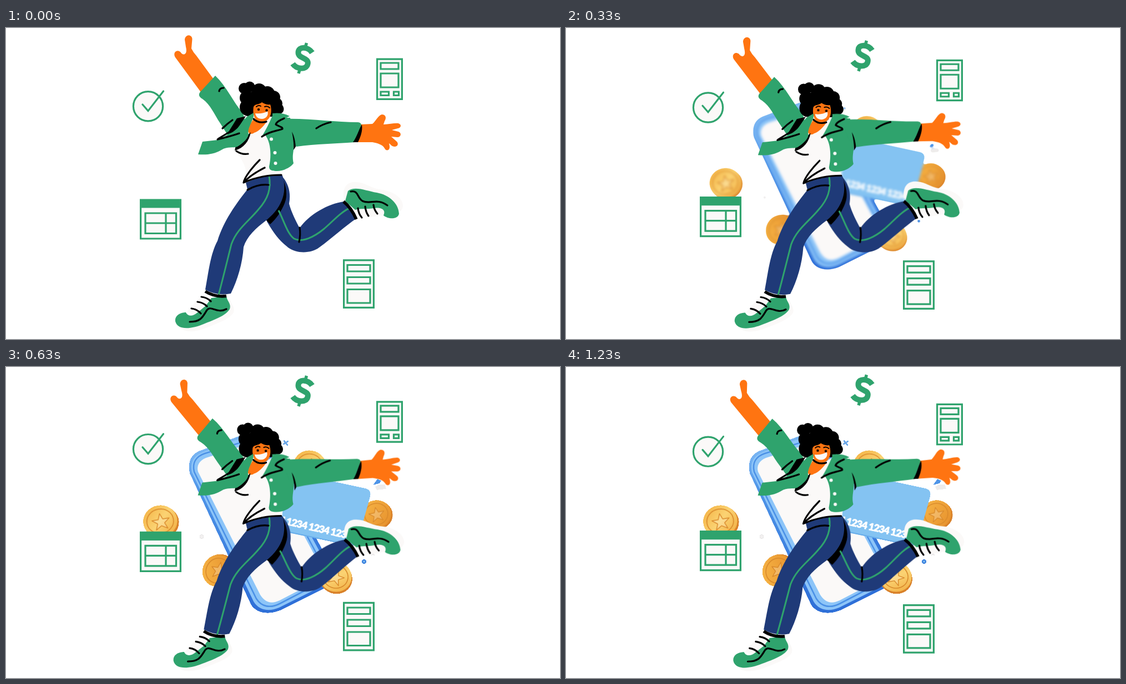
Animation, 998 px wide and 561 px high, one loop 1.31 s. Source, as an HTML page:

```html
<!DOCTYPE html>
<html lang="en">
<head>
<meta charset="utf-8">
<title>Leap</title>
<style>
@property --p { syntax: '<number>'; inherits: true; initial-value: 0; }
@property --q { syntax: '<number>'; inherits: true; initial-value: 0; }
@property --r { syntax: '<number>'; inherits: true; initial-value: 0; }
html, body { margin: 0; width: 100%; height: 100%; overflow: hidden; background: #fff; }
svg { display: block; width: 100%; height: 100%; animation: 1.31s linear infinite; animation-name: pose, slow, quick; }

/* sine up to the peak, then the first part of the way back */
@keyframes pose {
  0% { --p: 0; animation-timing-function: cubic-bezier(.37,0,.63,1); }
  71.8% { --p: 1; animation-timing-function: cubic-bezier(.333,0,.667,.333); }
  100% { --p: .7; }
}
@keyframes slow {
  0% { --q: 0; animation-timing-function: cubic-bezier(.37,0,.63,1); }
  86.3% { --q: 1; animation-timing-function: cubic-bezier(.333,0,.667,.333); }
  100% { --q: .96; }
}
@keyframes quick {
  0% { --r: 0; animation-timing-function: cubic-bezier(.37,0,.63,1); }
  68.7% { --r: 1; animation-timing-function: cubic-bezier(.333,0,.667,.333); }
  100% { --r: .88; }
}

/* x, y in px and a in degrees at the far end of the swing */
.m { transform: translate(calc(var(--p)*var(--x)*1px), calc(var(--p)*var(--y)*1px)) rotate(calc(var(--p)*var(--a)*1deg)); }
.body { --x: -.6; --y: 4.6; --a: 0; }
.head { --x: 0; --y: 0; --a: -2.6; transform-origin: 455px 175px; }
.arm-l { --x: 0; --y: 1; --a: -4; transform-origin: 420px 175px; }
.arm-r { --x: 0; --y: 0; --a: -4.5; transform-origin: 505px 185px; }
.leg-f { --x: 0; --y: 4; --a: 1; transform-origin: 470px 275px; }
.leg-b { --x: 2; --y: 3; --a: -2.6; transform-origin: 490px 300px; }
.slow { transform: translateY(calc(var(--q)*var(--y)*1px)); }
.quick { transform: translateY(calc(var(--r)*var(--y)*1px)); }

.back { filter: url(#crisp); animation: show 1.31s step-end infinite; }
.pop { transform-origin: 458px 298px; animation: pop 1.31s linear infinite; }
@keyframes show { 0% { visibility: hidden; } 7.4%, 100% { visibility: visible; } }
@keyframes pop {
  0% { transform: scale(.82); filter: blur(9px); }
  15.3% { transform: scale(.892); filter: blur(4.6px); }
  32.8% { transform: scale(.993); filter: blur(.3px); }
  40.5%, 100% { transform: none; filter: blur(0); }
}
.open { animation: open 1.31s step-end infinite; }
.shut { animation: shut 1.31s step-end infinite; }
@keyframes open { 0%, 22% { opacity: 1; } 10% { opacity: 0; } }
@keyframes shut { 0%, 22% { opacity: 0; } 10% { opacity: 1; } }

.g { fill: #2fa36d; } .o { fill: #ff7411; } .n { fill: #1f3a78; } .w { fill: #fbf9f8; }
.ln { fill: none; stroke: #000; stroke-width: 3.2; stroke-linecap: round; stroke-linejoin: round; }
.thin { stroke-width: 2; }
.cuff { stroke-width: 5.5; stroke-linecap: butt; }
.st { fill: none; stroke: #2fa36d; stroke-width: 3; }
.ic { fill: #fbf9f8; stroke: #2fa36d; stroke-width: 3.2; }
.num { font: 900 18px Lato, Inter, sans-serif; letter-spacing: -1px; fill: #fff; stroke: #fff; stroke-width: .7; }
</style>
</head>
<body>
<svg viewBox="0 0 998 561" preserveAspectRatio="none">
<defs>
  <filter id="crisp" filterUnits="userSpaceOnUse" x="0" y="0" width="998" height="561" color-interpolation-filters="sRGB">
    <feComponentTransfer><feFuncA type="linear" slope="5" intercept="-2.8"/></feComponentTransfer>
  </filter>
  <linearGradient id="gold" x1="0" y1="0" x2="1" y2="1">
    <stop offset="0" stop-color="#f3ae3d"/><stop offset=".5" stop-color="#fbd373"/><stop offset="1" stop-color="#f0a93c"/>
  </linearGradient>
  <linearGradient id="amber" x1="0" y1="0" x2="1" y2="1">
    <stop offset="0" stop-color="#f8b848"/><stop offset="1" stop-color="#e58e2b"/>
  </linearGradient>
  <linearGradient id="edge" x1="0" y1="0" x2=".3" y2="1">
    <stop offset="0" stop-color="#8fc6f8"/><stop offset=".3" stop-color="#4f95e8"/><stop offset="1" stop-color="#2f70d8"/>
  </linearGradient>
  <g id="coin">
    <ellipse cx="1" cy="2" rx="30" ry="28" fill="#d9822b"/>
    <ellipse cx="-1" cy="-1" rx="29.5" ry="27.5"/>
    <ellipse cx="-1" cy="-1" rx="23" ry="21" fill="none" stroke="#d98a2c" stroke-width="1.6"/>
    <path d="M0-14 4-4 15-4 6 3 10 13 0 7-10 13-6 3-15-4-4-4Z" fill="#fff" fill-opacity=".22" stroke="#d98a2c" stroke-width="1.4" stroke-linejoin="round"/>
  </g>
  <path id="shoeB" d="M611 312 616 294C628 284 650 294 668 297C690 301 707 316 708 335C706 346 688 345 680 338C685 328 676 323 664 325C650 327 640 325 629 328Z"/>
  <path id="shoeF" d="M370 487 397 484C399 494 406 497 403 507C396 519 376 526 356 534C335 543 309 546 305 529C304 517 316 513 324 513C327 520 336 521 344 514L360 501Z"/>
</defs>

<g class="back"><g class="pop">
  <use href="#coin" transform="translate(279 279) rotate(-10) scale(1.05)" fill="url(#gold)"/>
  <use href="#coin" transform="translate(548 179) rotate(10)" fill="url(#gold)"/>
  <use href="#coin" transform="translate(668 266) rotate(-12) scale(.92)" fill="url(#amber)"/>
  <use href="#coin" transform="translate(383 367) rotate(-60)" fill="url(#amber)"/>
  <path d="M331 192C326 168 336 155 352 150L424 123C442 118 454 120 462 132L588 362C596 382 592 390 576 398L494 439C472 448 450 444 441 428Z" fill="url(#edge)"/>
  <path d="M335 190C331 170 340 159 356 153L424 128C440 122 450 124 457 135L582 364C590 381 586 386 572 394L492 434C473 442 456 439 446 423Z" fill="#8dc5f8"/>
  <path d="M339 189C335 172 343 161 358 156L424 136 454 140 574 364C580 379 578 383 566 389L493 427C475 436 460 432 451 418Z" fill="#8dc5f8" stroke="#4b91e6" stroke-width="2.6"/>
  <path d="M346 189C343 178 348 169 360 164L424 143 452 146 569 364C574 377 573 380 562 385L493 421C478 428 467 425 458 411Z" fill="#fbf9f8"/>
  <path d="M505 188 648 219Q659 222 656 234L634 312Q631 323 618 321L495 296Z" fill="#84c3f2"/>
  <path d="M497 295 618 321Q631 323 634 312" fill="none" stroke="#69aeea" stroke-width="2"/>
  <text class="num" transform="translate(464 275) rotate(13)">1234 1234 1234 1234</text>
  <use href="#coin" transform="translate(594 379) rotate(20)" fill="url(#gold)"/>
  <path d="M501 133 507 141M508 134 500 139" stroke="#6fa9e8" stroke-width="3" stroke-linecap="round"/>
  <path d="M661 213 669 202 676 205 673 210Z" fill="#4f95e8"/>
  <path d="M665 216 671 212 683 212 685 220 668 222Z" fill="#eeeceb"/>
  <circle cx="645" cy="351" r="3" fill="#84c3f2" stroke="#3f83df" stroke-width="2.6"/>
  <circle cx="352.5" cy="306" r="3.6" fill="#f3f1f1" stroke="#e4e2e2"/>
  <path d="M658 334 664 340M664 334 658 340" stroke="#eae8e8" stroke-width="2"/>
</g></g>

<g class="ic slow" style="--y:11.5">
  <circle cx="256" cy="141.3" r="26.6"/>
  <path d="M246 138 256 149.5 283.5 114" fill="none" stroke-linecap="round"/>
</g>
<g class="quick" style="--y:-14" fill="none" stroke="#2fa36d">
  <path d="M551.5 44.5C545 34 527 32 526.5 44C526 56 546.5 53 543.5 65C541 76.500 523 74 516.5 64.500" stroke-width="10"/>
  <path d="M541.5 27 538 38M530.5 71 527 82" stroke-width="5.5"/>
</g>
<g class="ic slow" style="--y:11.5">
  <path d="M668.6 56.1H713.4V128.4H668.6ZM675 63H707V74H675ZM675 82H707V107H675ZM675 115H689.5V121.5H675ZM698.5 115H707.5V121.5H698.5Z"/>
</g>
<g class="ic quick" style="--y:-14.5">
  <path d="M242.6 310H314.4V380H242.6ZM251 334H306.5V370.5H251ZM288 334V370.5M251 352H306.5"/>
  <path class="g" d="M242.600 310.600H314.400V323H242.600Z"/>
</g>
<g class="ic slow" style="--y:11">
  <path d="M608.6 418.8H662.4V504.3H608.6ZM615 427.5H656V439H615ZM615 449.5H656V461H615ZM615 471.5H656V496H615Z"/>
</g>

<g class="m leg-b">
  <path class="w" d="M608 306C606 284 618 276 632 278C648 279 655 288 672 291C700 294 716 308 715 322C712 336 700 330 690 336L650 342 630 330Z"/>
  <path class="n" d="M496 266C511 282 513 300 510 317C514 332 522 348 529 361C545 337 580 317 609 313L632 343C610 358 590 377 564 396C550 407 521 408 506 394C492 383 482 370 470 349L490 300Z"/>
  <path d="M497 268C505 285 508 302 502 316C496 331 487 344 476 354L464 342 480 300Z"/>
  <path class="st" d="M491 329C500 346 507 372 519 380C534 388 556 376 572 363C588 350 602 332 621 324"/>
  <path class="ln" d="M529 360Q531 373 528 386"/>
  <use href="#shoeB" class="g"/>
  <path class="ln cuff" d="M608 313Q622 324 631 345"/>
  <path class="ln" d="M634 325Q635 335 641 342M647 322Q648 332 653 339M662 319Q663 328 669 335M621 295C635 292 632 306 642 312C656 319 668 306 687 320"/>
</g>

<g class="m leg-f">
  <use href="#shoeF" class="w" transform="translate(7 6)"/>
  <path class="n" d="M432 279Q462 264 498 266C506 292 501 320 470 346C450 361 434 376 428 395C426 425 417 455 405 479Q381 484 359 472C365 440 368 408 381 384C392 348 415 316 435 291Z"/>
  <path class="st" d="M474 267C478 290 472 308 455 327C438 348 416 362 406 390C398 422 390 455 383 481"/>
  <path class="ln" d="M435 292Q454 281 473 283"/>
  <path class="w" d="M326 512 345 490 357 482 372 488 362 505 342 519Z"/>
  <use href="#shoeF" class="g"/>
  <path class="ln cuff" d="M359 475Q376 486 397 483.500"/>
  <path class="ln" d="M334 506Q344 507 351 515M345 494Q355 495 362 502M352 485Q362 486 369 493M331 530C350 530 354 522 360 512C368 496 378 517 397 507"/>
</g>

<g class="m body">
  <path class="w" d="M479 160 436 190 414 222C424 236 432 248 432 260L427 279Q456 264 497 264L482 240 480 195Z"/>
  <path class="ln" d="M430 278Q460 265 496 265"/>
  <path class="ln" d="M457 238C445 250 430 268 428 279C438 267 452 259 466 252M415 222Q425 229 436 227"/>

  <g class="m arm-l">
    <path class="o" d="M352 117 305 53C300 45 307 38 314 43Q318 49 322 47C326 45 325 38 324 34L322 21C323 11 335 11 335.500 20L334 37Q338 45 343 50L376 95Z"/>
    <path class="g" d="M377 86 353 112C345 119 347 124 354 128C369 139 374 154 386 172L400 194 432 172 427 154C408 132 398 106 377 86Z"/>
    <path class="ln" d="M384 114Q385 108 392 108"/>
  </g>

  <g class="m head">
    <g>
      <circle cx="429" cy="109" r="10"/><circle cx="439" cy="106" r="9.5"/><circle cx="456" cy="113" r="13"/>
      <circle cx="471" cy="118" r="13"/><circle cx="482" cy="125" r="12"/><circle cx="488" cy="136" r="10"/>
      <circle cx="491" cy="146" r="9.5"/><circle cx="434" cy="126" r="13"/><circle cx="437" cy="143" r="16"/>
      <circle cx="455" cy="134" r="23"/><circle cx="478" cy="146" r="14"/>
    </g>
    <path class="o" d="M446 142C449 136 455 139 461 134C466 137 470 139 476 138C480 150 478 168 461 170C447 170 444 154 446 142Z"/>
    <path class="w" d="M449 154C457 155 465 154 471 150C474 157 468 164 461 164C454 164 450 160 449 154Z"/>
    <path class="ln thin" d="M451 142Q455 138 459 141M466 142Q471 140 475 144"/>
    <g class="open"><circle cx="455" cy="147" r="2.2"/><circle cx="469.5" cy="148.5" r="2.2"/></g>
    <path class="ln thin shut" d="M452 148Q456 144 459 148M466 149Q470 145 473 150"/>
  </g>
  <path class="o" d="M447 162 436 180C434 189 440 194 447 189C456 186 463 178 470 169Q456 174 447 162Z"/>
  <path class="ln" d="M446 164Q455 173 469 169"/>

  <path d="M416 163 432 159 414 186 398 192Z"/>
  <path d="M441 188C438 204 428 217 412 221L414 212Z"/>
  <path class="g" d="M446 153 434 160C426 168 420 180 408 188L381 202 354 205 346 228C362 229 374 228 388 220C399 213 410 217 417 214C430 206 436 198 437 192C434 184 442 172 446 160Z"/>
  <path class="ln" d="M390 181Q398 173 408 166M381 201Q406 195 420 190M382 200Q402 188 416 179"/>

  <path class="g" d="M480 160 466 192C478 206 478 232 474 250C474 257 480 258 488 258C500 258 512 252 518 244C515 232 518 224 519 210L512 162Z"/>
  <g class="m arm-r">
    <path class="o" d="M638 174 660 173C667 167 670 158 677 156C684 156 686 162 682 168L680 174C690 174 700 171 707 172C713 174 712 180 706 181L695 184 707 187C713 189 712 197 705 197L694 196 703 204C708 208 706 214 700 214C695 214 693 210 690 208L691 213C692 221 685 223 682 217C678 210 670 208 660 206L628 206Z"/>
    <path class="g" d="M496 164C545 162 590 170 634 170Q642 171 639 178L629 206C590 209 560 209 523 214L510 200Z"/>
    <path d="M641 174C643 186 638 198 634 206L625 206C632 197 635 184 641 174Z"/>
    <path d="M515 187C520 196 521 205 522 214L518 220C519 208 517 198 515 187Z"/>
    <path class="ln" d="M559 181Q571 173 585 170"/>
  </g>
  <path class="g" d="M480 158C474 172 468 184 460 197Q478 187 497 182L500 164 511 159Q498 152 480 154Z"/>
  <path class="ln" d="M501 163C494 166 487 169 486 174C491 178 499 178 498 182C488 186 475 186 461 196"/>
  <g class="w"><circle cx="478" cy="200.5" r="3"/><circle cx="484.5" cy="225" r="3"/><circle cx="485.5" cy="244" r="3"/></g>
</g>
</svg>
</body>
</html>
```
